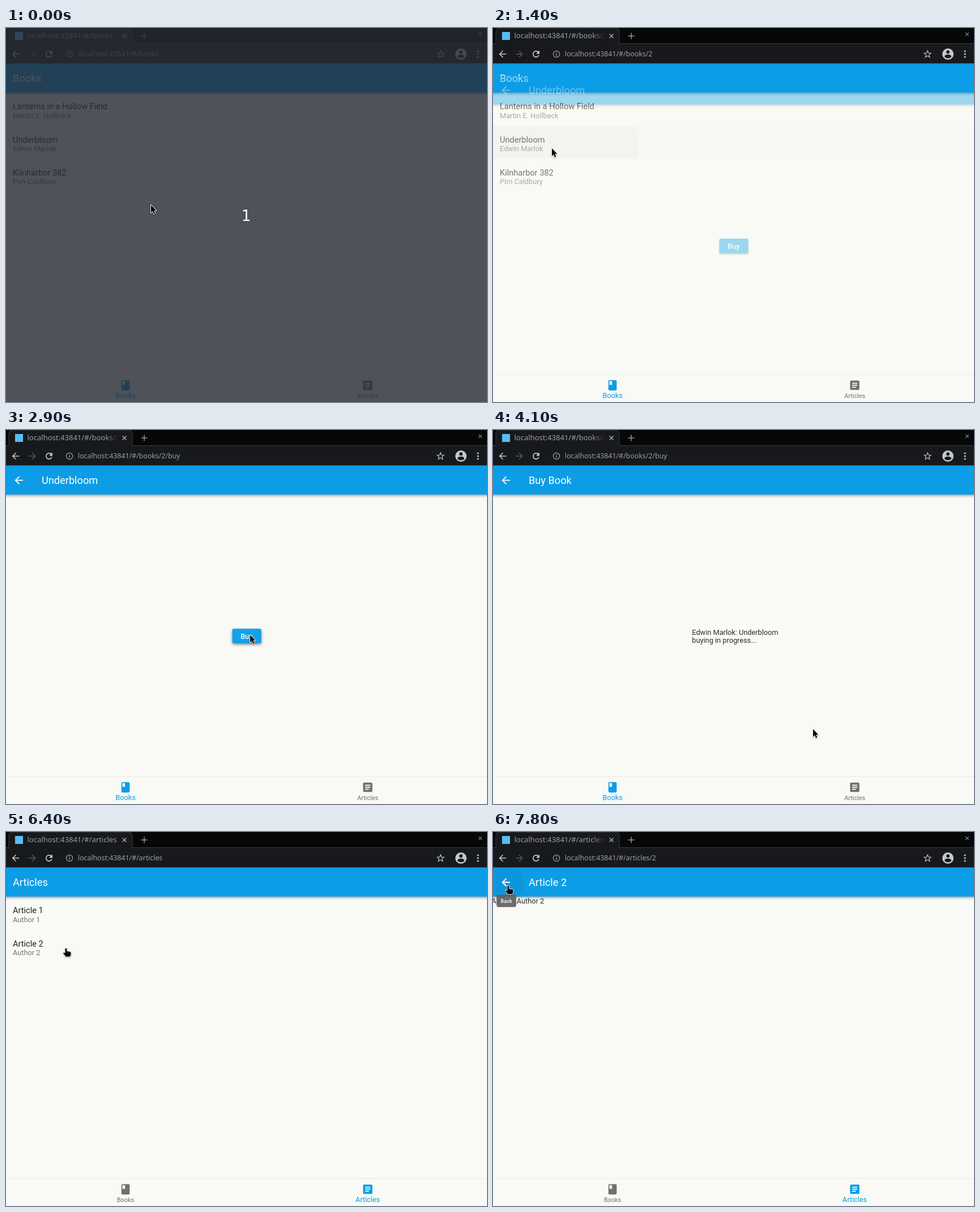
Write an HTML page with a canvas that moves like this. It is 849x659 px and loops after 8000 ms.

```html
<!DOCTYPE html>
<html lang="en">
<head>
<meta charset="utf-8">
<title>Book shop navigation</title>
<style>
html, body { margin: 0; width: 100%; height: 100%; overflow: hidden; background: #060707; }
canvas { display: block; }
</style>
</head>
<body>
<canvas id="stage" width="849" height="659"></canvas>
<script>
const W = 849, H = 659, LOOP = 8000, STEP = 100;
const TOP = 62.5, BAR_BOTTOM = 113.8, NAV_TOP = 611;
const BLUE = '#0c9de6', PAPER = '#f9faf5', TOOLBAR = '#17191c', CHROME_GREY = '#9b9ea2', EDGE = '#3a3d40';
const UI = 'Roboto, sans-serif', CHROME = '"Noto Sans", sans-serif';

const ctx = document.getElementById('stage').getContext('2d');
const layer = Object.assign(document.createElement('canvas'), { width: W, height: H });
const layerCtx = layer.getContext('2d');

const ICONS = {
  back: new Path2D('M20 11H7.8l5.6-5.6L12 4l-8 8 8 8 1.4-1.4L7.8 13H20z'),
  book: new Path2D('M18 2H6Q4 2 4 4v16q0 2 2 2h12q2 0 2-2V4q0-2-2-2zM6 4h5v8l-2.5-1.5L6 12z'),
  article: new Path2D('M19 3H5Q3 3 3 5v14q0 2 2 2h14q2 0 2-2V5q0-2-2-2zm-5 14H7v-2h7zm3-4H7v-2h10zm0-4H7V7h10z')
};
const ARROW = new Path2D('M0 0V13.5L3 10.7 5 15.4 7.2 14.4 5.2 9.8H9.2Z');
const HAND = new Path2D('M-1.5 0.5Q0 -1 1.3 0.5V5L7 6Q8.5 6.5 8.5 8V11L7 14.5H-.5L-5 8.5Q-4.5 6.5-1.5 8.5Z');

const BOOKS = [
  ['Lanterns in a Hollow Field', 'Martin E. Hollbeck'],
  ['Underbloom', 'Edwin Marlok'],
  ['Kilnharbor 382', 'Pim Caldbury']
];
const ARTICLES = [['Article 1', 'Author 1'], ['Article 2', 'Author 2']];

// time, x, y, pointing hand
const CURSOR = [
  [0, 256, 312], [400, 228, 298], [500, 158, 256], [600, 116, 232, 1], [800, 105, 211, 1],
  [1300, 104, 212], [1900, 116, 217], [2000, 170, 240], [2100, 265, 285], [2200, 360, 330],
  [2300, 415, 353, 1], [2400, 431, 361, 1], [2900, 431, 361], [4100, 565, 527], [4200, 611, 590],
  [4400, 617, 601], [4500, 630, 616, 1], [4600, 638, 624, 1], [4700, 642, 627, 1],
  [6000, 560, 565], [6100, 400, 438], [6200, 235, 300], [6300, 140, 228, 1], [6400, 106, 205, 1],
  [6700, 106, 205], [7400, 101, 190], [7500, 80, 152], [7600, 50, 117], [7700, 33, 100, 1], [7800, 27, 95, 1]
];

const clamp = v => Math.min(1, Math.max(0, v));
const mix = (a, b, p) => a + (b - a) * p;

function bezier(x1, y1, x2, y2) {
  const curve = (a, b, s) => 3 * a * s * (1 - s) ** 2 + 3 * b * s * s * (1 - s) + s ** 3;
  return x => {
    let lo = 0, hi = 1;
    for (let i = 0; i < 24; i++) {
      const mid = (lo + hi) / 2;
      if (curve(x1, x2, mid) < x) lo = mid; else hi = mid;
    }
    return curve(y1, y2, hi);
  };
}
const easeIn = bezier(.42, 0, 1, 1), fastOutSlowIn = bezier(.4, 0, .2, 1);

function text(g, str, x, y, size, color, { font = UI, weight = 400, align = 'left' } = {}) {
  g.font = `${weight} ${size}px ${font}`;
  g.textAlign = align;
  g.fillStyle = color;
  g.fillText(str, x, y);
}

function rect(g, x, y, w, h, color, radius = 0) {
  g.fillStyle = color;
  g.beginPath();
  g.roundRect(x, y, w, h, radius);
  g.fill();
}

function disc(g, x, y, r, color) {
  g.fillStyle = color;
  g.beginPath();
  g.arc(x, y, r, 0, 7);
  g.fill();
}

function line(g, color, width, ...points) {
  g.strokeStyle = color;
  g.lineWidth = width;
  g.beginPath();
  points.forEach(([x, y]) => g.lineTo(x, y));
  g.stroke();
}

function icon(g, path, x, y, size, color, flip = 1) {
  g.save();
  g.translate(x, y);
  g.scale(flip * size / 24, size / 24);
  g.translate(-12, -12);
  g.fillStyle = color;
  g.fill(path, 'evenodd');
  g.restore();
}

function withShadow(g, alpha, blur, dy, draw) {
  g.save();
  g.shadowColor = `rgba(0,0,0,${alpha})`;
  g.shadowBlur = blur;
  g.shadowOffsetY = dy;
  draw();
  g.restore();
}

function clipped(g, x, y, w, h, draw) {
  g.save();
  g.beginPath();
  g.rect(x, y, w, h);
  g.clip();
  draw();
  g.restore();
}

function cross(x, y, r, color, width) {
  line(ctx, color, width, [x - r, y - r], [x + r, y + r]);
  line(ctx, color, width, [x - r, y + r], [x + r, y - r]);
}

function chrome(path) {
  const url = 'localhost:43841/#/' + path;
  rect(ctx, 0, 0, W, 28, '#060707');
  rect(ctx, 0, 28, W, TOP - 28, TOOLBAR);
  line(ctx, EDGE, 1, [0, 27.5], [W, 27.5]);
  rect(ctx, 4.5, -.5, 219, 28.5, EDGE, [7, 7, 0, 0]);
  rect(ctx, 5.5, .5, 217, 28.5, TOOLBAR, [6, 6, 0, 0]);
  rect(ctx, 16, 7, 14, 14, '#5bbcf0');

  ctx.font = `13.04px ${CHROME}`;
  let ink = CHROME_GREY;
  if (ctx.measureText(url).width > 163) {
    ink = ctx.createLinearGradient(176, 0, 199, 0);
    ink.addColorStop(0, CHROME_GREY);
    ink.addColorStop(1, TOOLBAR);
  }
  clipped(ctx, 37, 0, 164, 28, () => text(ctx, url, 37.5, 18.3, 13.04, ink, { font: CHROME }));
  cross(209, 14, 3.5, '#a9acaf', 1.4);
  line(ctx, CHROME_GREY, 1.4, [238.5, 14], [249.5, 14]);
  line(ctx, CHROME_GREY, 1.4, [244, 8.5], [244, 19.5]);
  cross(837, 11, 2.8, '#8a8d90', 1.2);

  const light = '#c6c9cc';
  icon(ctx, ICONS.back, 17, 46, 19, light);
  icon(ctx, ICONS.back, 46.5, 46, 19, '#54575b', -1);
  ctx.strokeStyle = light;
  ctx.lineWidth = 1.7;
  ctx.beginPath();
  ctx.arc(76, 46, 5.2, .35, 5.5);
  ctx.stroke();
  ctx.fillStyle = light;
  ctx.fill(new Path2D('M82 39.5v6h-6z'));

  ctx.strokeStyle = CHROME_GREY;
  ctx.lineWidth = 1.2;
  ctx.beginPath();
  ctx.arc(112, 46, 5.6, 0, 7);
  ctx.stroke();
  rect(ctx, 111.3, 45, 1.4, 4, CHROME_GREY);
  rect(ctx, 111.3, 42.6, 1.4, 1.4, CHROME_GREY);
  text(ctx, url, 126.7, 50.3, 12.35, CHROME_GREY, { font: CHROME });

  const star = Array.from({ length: 12 }, (_, i) => {
    const r = i % 2 ? 2.8 : 6.3, a = i * Math.PI / 5 - Math.PI / 2;
    return [767 + r * Math.cos(a), 46.3 + r * Math.sin(a)];
  });
  line(ctx, light, 1.2, ...star);
  disc(ctx, 803, 46, 10, light);
  disc(ctx, 803, 42.3, 3, TOOLBAR);
  ctx.beginPath();
  ctx.ellipse(803, 50, 6, 3.2, 0, 0, 7);
  ctx.fill();
  [41, 46, 51].forEach(y => disc(ctx, 833, y, 1.6, light));
}

function page(g, title, hasBack, body) {
  rect(g, 0, TOP, W, H - TOP, PAPER);
  body(g);
  withShadow(g, .42, 5, 2, () => rect(g, -10, TOP, W + 20, BAR_BOTTOM - TOP, BLUE));
  if (hasBack) icon(g, ICONS.back, 22.8, 88.7, 21.9, '#fff');
  text(g, title, hasBack ? 63 : 12, 95.4, 18.2, '#fff');
}

function list(g, items) {
  items.forEach(([title, author], i) => {
    const y = i * 58.3;
    text(g, title, 12, 143.4 + y, 14.57, '#212220');
    text(g, author, 12, 158.7 + y, 12.75, '#757673');
  });
}

function tileRipple(g, t) {
  if (t < 1300 || t > 1500) return;
  clipped(g, 0, 172, W, 58.5, () => {
    rect(g, 0, 172, W, 59, 'rgba(0,0,0,.01)');
    disc(g, 104, 212, mix(40, 152, (t - 1300) / 100), 'rgba(0,0,0,.022)');
  });
}

function buyButton(g, hover) {
  withShadow(g, hover ? .5 : .4, hover ? 5 : 3, 2, () =>
    rect(g, 399.5, 350.2, 51, 25.6, hover ? '#12a2ea' : BLUE, 2.5));
  text(g, 'Buy', 424.7, 367.6, 12.75, '#fff', { weight: 500, align: 'center' });
}

const PAGES = {
  books: (g, t) => page(g, 'Books', false, () => { tileRipple(g, t); list(g, BOOKS); }),
  book: (g, t) => page(g, BOOKS[1][0], true, () => buyButton(g, t >= 2400)),
  buy: g => page(g, 'Buy Book', true, () => {
    text(g, `${BOOKS[1][1]}: ${BOOKS[1][0]}`, 351.3, 360.6, 12.75, '#2b2c2a');
    text(g, 'buying in progress...', 351.3, 375.2, 12.75, '#2b2c2a');
  }),
  articles: g => page(g, 'Articles', false, () => list(g, ARTICLES)),
  article: g => page(g, 'Article 2', true, () => text(g, 'Author: Author 2', -2.6, 125.8, 12.75, '#2b2c2a'))
};

// start of the motion, first visible moment, pages below and above
const PUSHES = [
  { start: 1230, from: 1400, below: 'books', above: 'book' },
  { start: 2760, from: 3000, below: 'book', above: 'buy' },
  { start: 6682, from: 6800, below: 'articles', above: 'article' }
];

function content(t) {
  const push = PUSHES.filter(p => t >= p.from).pop();
  if (!push) return PAGES.books(ctx, t);
  if (t >= 5100 && push.above === 'buy') return PAGES.articles(ctx, t);
  const progress = clamp((t - push.start) / 300);
  if (progress === 1) return PAGES[push.above](ctx, t);
  PAGES[push.below](ctx, t);
  layerCtx.clearRect(0, 0, W, H);
  PAGES[push.above](layerCtx, t);
  ctx.globalAlpha = easeIn(progress);
  ctx.drawImage(layer, 0, 137 * (1 - fastOutSlowIn(progress)));
  ctx.globalAlpha = 1;
}

function navItem(label, path, x, active) {
  const color = `rgb(${[[112, 12], [113, 157], [110, 230]].map(([a, b]) => Math.round(mix(a, b, active)))})`;
  icon(ctx, path, x, 629.5, 21.9, color);
  text(ctx, label, x, 652.2, mix(10.93, 12.75, active), color, { align: 'center' });
}

function navBar(t) {
  rect(ctx, 0, NAV_TOP, W, H - NAV_TOP, PAPER);
  rect(ctx, 0, NAV_TOP - 1, W, 1, '#ebece7');
  if (t >= 5100 && t < 6000)
    clipped(ctx, 0, NAV_TOP, W, H, () => disc(ctx, 638.6, 637, 32, 'rgba(0,0,0,.045)'));
  const switched = clamp((t - 5000) / 200);
  navItem('Books', ICONS.book, 211, 1 - switched);
  navItem('Articles', ICONS.article, 638.5, switched);
}

function tooltip(label, x, y, w, alpha) {
  ctx.globalAlpha = alpha;
  rect(ctx, x, y, w, 21.8, 'rgba(97,97,97,.92)', 3.6);
  text(ctx, label, x + w / 2, y + 14.2, 9.11, '#fff', { weight: 500, align: 'center' });
  ctx.globalAlpha = 1;
}

function cursor(t) {
  const [, x, y, hand] = CURSOR.filter(k => k[0] <= t).pop();
  const shape = hand ? HAND : ARROW;
  ctx.save();
  ctx.translate(x, y);
  ctx.lineJoin = 'round';
  ctx.strokeStyle = '#fff';
  ctx.lineWidth = 1.8;
  withShadow(ctx, .4, 2, 1, () => ctx.stroke(shape));
  ctx.fillStyle = '#000';
  ctx.fill(shape);
  if (hand) [2.6, 4.8].forEach(dx => line(ctx, '#777', .6, [dx, 6.5], [dx, 9]));
  ctx.restore();
}

function address(t) {
  if (t >= 6700) return 'articles/2';
  if (t >= 5100) return 'articles';
  if (t >= 2900) return 'books/2/buy';
  return t >= 1300 ? 'books/2' : 'books';
}

function render(t) {
  chrome(address(t));
  clipped(ctx, 0, TOP, W, H - TOP, () => content(t));
  navBar(t);
  if (t >= 4500 && t < 4900) tooltip('Articles', 615, 580.2, 47, clamp((t - 4400) / 200));
  if (t >= 7600) {
    clipped(ctx, 0, TOP, W, BAR_BOTTOM - TOP, () => disc(ctx, 22.8, 89, 32, 'rgba(0,0,0,.04)'));
    icon(ctx, ICONS.back, 22.8, 88.7, 21.9, '#fff');
    tooltip('Back', 6.3, 110.4, 34.7, clamp((t - 7500) / 300));
  }
  if (t < 100) {
    rect(ctx, 0, 0, W, H, 'rgba(40,44,53,.81)');
    text(ctx, '1', 424, 339.6, 26.5, '#fff', { font: '"DejaVu Sans", sans-serif', align: 'center' });
  }
  cursor(t);
}

function frame() {
  const t = performance.now() % LOOP;
  ctx.clearRect(0, 0, W, H);
  render(Math.floor(t / STEP) * STEP);
  requestAnimationFrame(frame);
}
frame();
</script>
</body>
</html>
```
